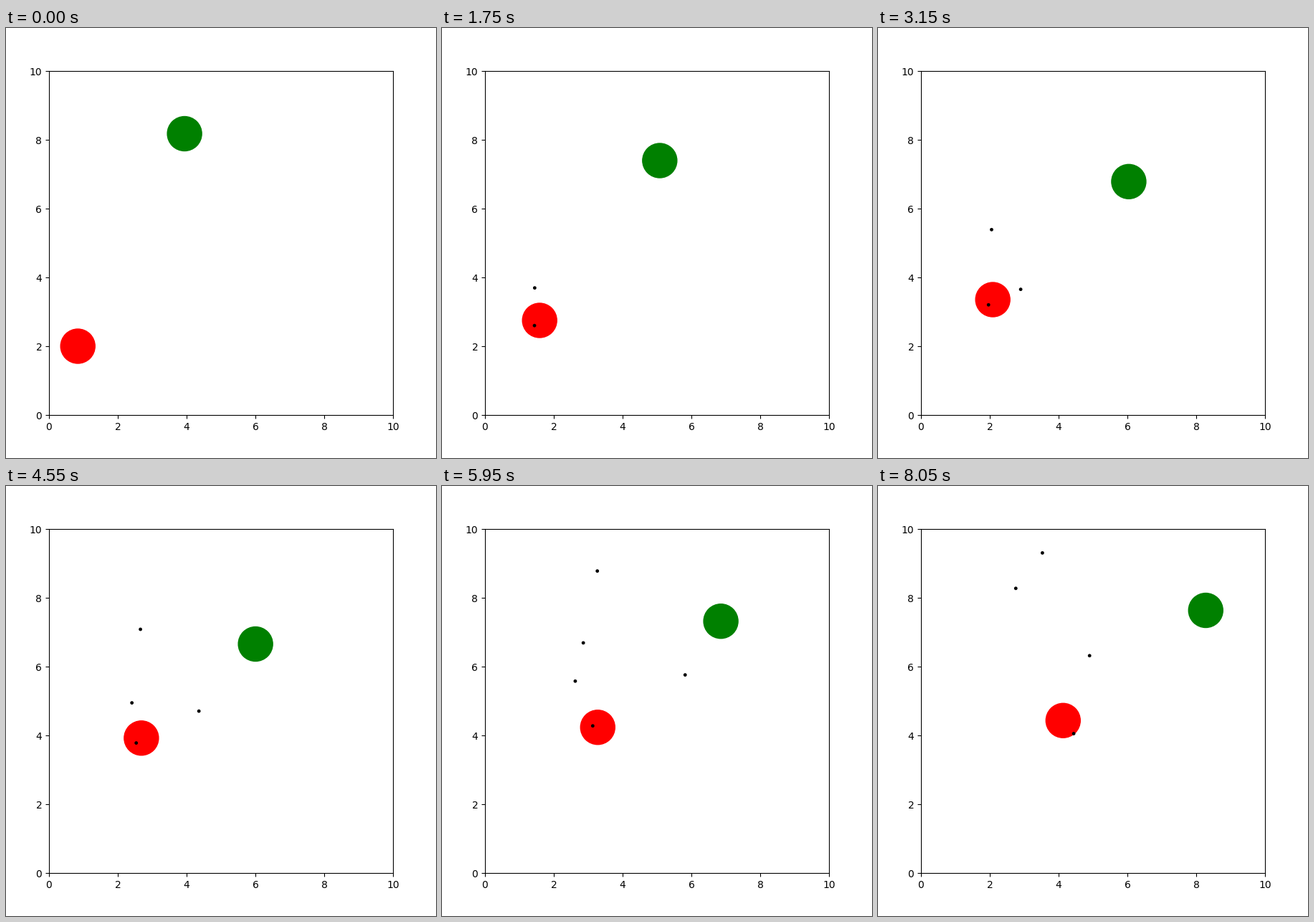
A matplotlib script that plays this animation: 600x600 px, repeating every 8400 ms.

```python
import numpy as np
import matplotlib.pyplot as plt
from matplotlib.animation import FuncAnimation
from matplotlib.patches import Circle

FRAMES = 24
INTERVAL = 350
SIZE = 10
RADIUS = 0.5


def walk(*turns):
    """Straight moves at even speed between turning points (step, x, y)."""
    when, xs, ys = zip(*turns)
    steps = np.arange(FRAMES)
    return np.column_stack([np.interp(steps, when, xs),
                            np.interp(steps, when, ys)])


hunter = walk((0, 0.838, 2.0), (5, 1.588, 2.75), (9, 2.087, 3.354),
              (13, 2.685, 3.922), (16, 3.132, 4.277), (17, 3.277, 4.235),
              (20, 3.725, 4.6), (23, 4.131, 4.432))
prey = walk((0, 3.94, 8.177), (5, 5.08, 7.396), (9, 6.04, 6.785),
            (12, 6.06, 6.69), (13, 6.003, 6.656), (17, 6.856, 7.319),
            (20, 7.566, 8.02), (23, 8.277, 7.635))

# A shot leaves the hunter's previous place every fourth step.
SHOT_EVERY = 4
SHOT_SPEED = 0.45
SHOT_ANGLES = np.radians([70.3, 35.8, 75.6, 87.2, 49.1, -37.5])
headings = np.column_stack([np.cos(SHOT_ANGLES), np.sin(SHOT_ANGLES)])

fig = plt.figure(figsize=(6, 6), dpi=100)
ax = fig.add_axes([0.1, 0.1, 0.8, 0.8])
ax.set(xlim=(0, SIZE), ylim=(0, SIZE))

red = ax.add_patch(Circle(hunter[0], RADIUS, color="red"))
green = ax.add_patch(Circle(prey[0], RADIUS, color="green"))
shots = [ax.add_patch(Circle((0, 0), 0.05, fc="black", lw=0, visible=False))
         for _ in headings]


def draw(step):
    red.center = hunter[step]
    green.center = prey[step]
    for k, (shot, heading) in enumerate(zip(shots, headings)):
        start = SHOT_EVERY * k
        age = step - 1 - start
        pos = hunter[start] + SHOT_SPEED * age * heading
        hit = np.hypot(*(pos - prey[step])) < RADIUS
        shot.center = pos
        shot.set_visible(age >= 0 and pos.max() <= SIZE and not hit)
    return red, green, *shots


anim = FuncAnimation(fig, draw, frames=FRAMES, interval=INTERVAL,
                     repeat=True, repeat_delay=0)
plt.show()
```
